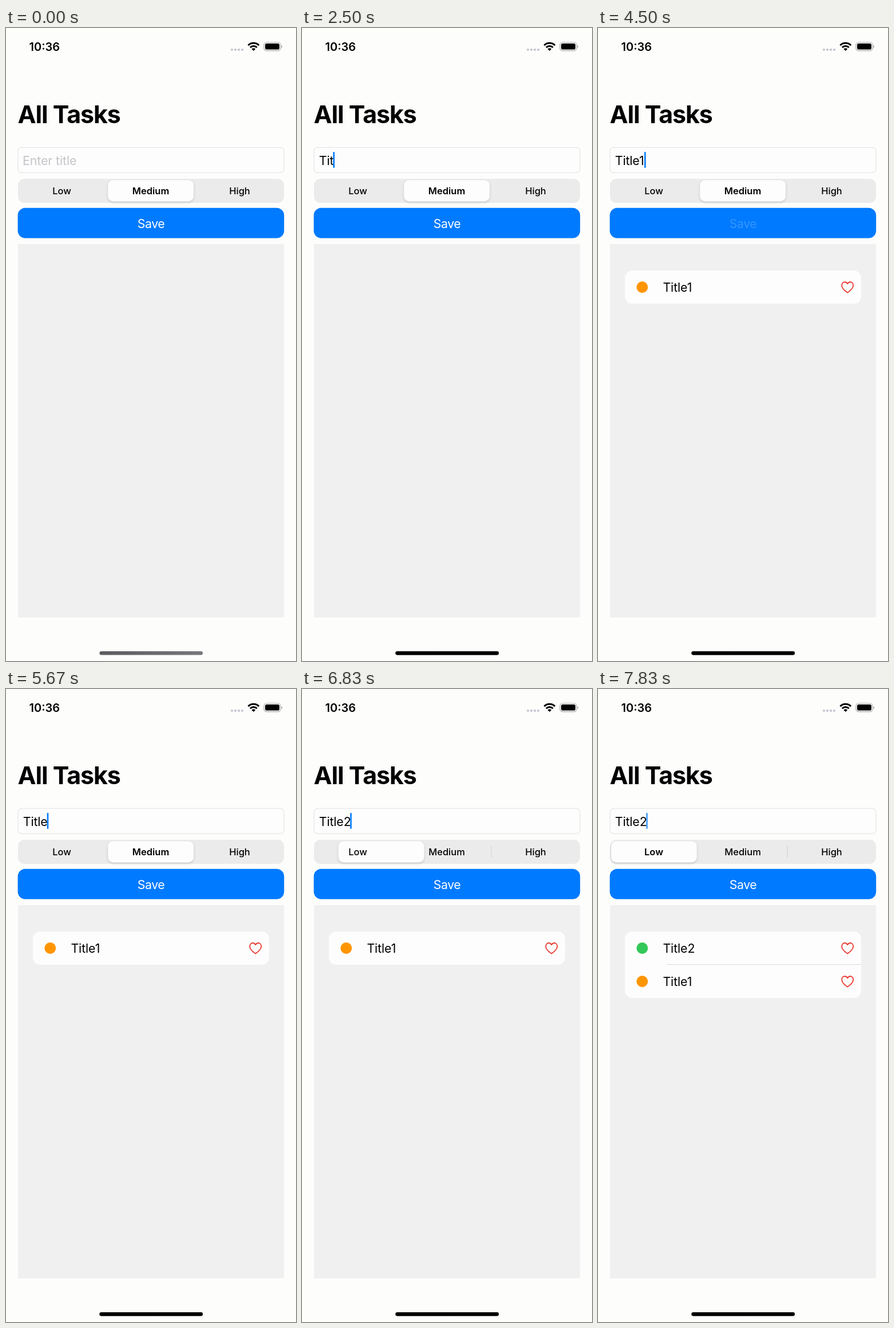
An HTML page for the animation above (8000 ms loop, 507 px wide and 1104 px high).

```html
<!DOCTYPE html>
<html lang="en">
<head>
<meta charset="utf-8">
<title>All Tasks</title>
<style>
  html, body { margin: 0; width: 100%; height: 100%; overflow: hidden; background: #fdfdfc; }
  svg { display: block; width: 507px; height: 1104px; }
  text { font-family: Inter, "Noto Sans", sans-serif; }
  .body { font-size: 21.4px; letter-spacing: -0.12px; }
  .seg { font-size: 16.5px; font-weight: 500; text-anchor: middle; }
  .heart { fill: none; stroke: #ec3a30; stroke-width: 1.8; stroke-linejoin: round; }
</style>
</head>
<body>
<svg viewBox="0 0 507 1104" xmlns="http://www.w3.org/2000/svg">
  <defs>
    <linearGradient id="barFill">
      <stop offset="0" stop-color="#5c5c60"/>
      <stop offset="1" stop-color="#77777c"/>
    </linearGradient>
    <filter id="soft" x="-10%" y="-30%" width="120%" height="170%">
      <feDropShadow dx="0" dy="2" stdDeviation="2.2" flood-color="#000" flood-opacity="0.17"/>
    </filter>
    <path id="heart" class="heart" d="M0 9.3C-4 6.7-10 2-10-3.4C-10-7-7.6-9.2-4.9-9.2C-2.6-9.2-1-8-0-6C1-8 2.6-9.2 4.9-9.2C7.6-9.2 10-7 10-3.4C10 2 4 6.7 0 9.3Z"/>
  </defs>
  <rect width="507" height="1104" fill="#fdfdfc"/>

  <!-- status bar -->
  <text x="40.5" y="40" font-size="20" font-weight="600">10:36</text>
  <g fill="#c5c5d2">
    <circle cx="395" cy="37.8" r="2.1"/><circle cx="401" cy="37.8" r="2.1"/>
    <circle cx="407" cy="37.8" r="2.1"/><circle cx="413" cy="37.8" r="2.1"/>
  </g>
  <g fill="none" stroke="#000" stroke-width="3">
    <path d="M423.4 30.2A13.3 13.3 0 0 1 442.2 30.2"/>
    <path d="M426.9 34A8.2 8.2 0 0 1 438.7 34"/>
  </g>
  <path d="M432.8 40L429.4 36.6A4.8 4.8 0 0 1 436.2 36.6Z"/>
  <rect x="451" y="25" width="29" height="14.6" rx="4.6" fill="none" stroke="#a6a6a8" stroke-width="1.2"/>
  <rect x="453" y="27" width="25" height="10.6" rx="2.8"/>
  <path d="M481.4 30V35Q483 34.3 483 32.5T481.4 30Z" fill="#a6a6a8"/>

  <text x="20.5" y="166.3" font-size="43" font-weight="700" letter-spacing="-1.1">All Tasks</text>

  <!-- title field -->
  <rect x="21" y="208.3" width="465" height="44" rx="6.5" fill="#fdfdfd" stroke="#e2e2e3" stroke-width="1.1"/>
  <text id="hint" class="body" x="29" y="238.6" fill="#c4c4ca">Enter title</text>
  <text id="typed" class="body" x="29.7" y="238.6"></text>
  <rect id="caret" y="216" width="2.6" height="28" rx="1.2" fill="#007aff"/>

  <!-- priority picker -->
  <rect x="21" y="263" width="465" height="42" rx="11" fill="#ebebec"/>
  <rect id="split" x="330.5" y="273" width="1.2" height="22" fill="#d4d4d5"/>
  <rect id="thumb" y="265.6" width="149.6" height="36.6" rx="9" fill="#fdfdfd" filter="url(#soft)"/>
  <text id="low" class="seg" x="97.5" y="290">Low</text>
  <text id="medium" class="seg" x="253" y="290">Medium</text>
  <text class="seg" x="408.5" y="290">High</text>

  <rect x="20.6" y="313.8" width="465.6" height="52.8" rx="13" fill="#007aff"/>
  <text id="save" x="253.5" y="348.6" font-size="21.4" letter-spacing="-0.5" fill="#fff" text-anchor="middle">Save</text>

  <!-- task list -->
  <rect x="21" y="377" width="465" height="651" fill="#f0f0f1"/>
  <rect id="card" x="47" y="423" width="413" rx="13" fill="#fdfdfd"/>
  <g id="first">
    <circle cx="77.3" cy="452" r="9.9" fill="#ff9500"/>
    <text class="body" x="113.4" y="459.8">Title1</text>
    <use href="#heart" x="436.2" y="452.2"/>
  </g>
  <g id="second">
    <circle cx="77.3" cy="452" r="9.9" fill="#34c759"/>
    <text class="body" x="113.4" y="459.8">Title2</text>
    <use href="#heart" x="436.2" y="452.2"/>
    <rect x="120" y="480" width="340" height="1.1" fill="#dcdcde"/>
  </g>

  <rect x="163.5" y="1087" width="180.5" height="6.6" rx="3.3" fill="url(#barFill)"/>
  <rect id="bar" x="163.5" y="1087" width="180.5" height="6.6" rx="3.3"/>
</svg>
<script>
const LOOP = 8000;
const FOCUS = 1330, ADD_1 = 4500, ADD_2 = 7420, SLIDE = 6660;
// time, field text, caret position
const typing = [
  [0, "", 30], [2250, "T", 42.5], [2420, "Ti", 47.5], [2500, "Tit", 54.4],
  [2750, "Titl", 59.8], [3000, "Title", 71.7], [3250, "Title1", 81],
  [5670, "Title", 71.7], [6330, "Title2", 84.2]
];
// caret fades: start time, target opacity
const blinks = [
  [FOCUS, 1], [2080, 0], [3750, 0], [4170, 1], [4670, 0], [5080, 1],
  [6830, 0], [7250, 1], [7750, 0]
];
const el = {};
document.querySelectorAll("svg [id]").forEach(n => el[n.id] = n);

const ramp = (t, start, len) => Math.min(1, Math.max(0, (t - start) / len));
const smooth = p => p * p * (3 - 2 * p);
const show = (node, on) => node.setAttribute("opacity", +on);

function caretAlpha(t, lastKey) {
  let a = lastKey > 0 ? 1 : 0;
  for (const [start, to] of blinks) {
    if (start < lastKey || t < start) continue;
    a += (to - a) * smooth(ramp(t, start, 250));
  }
  return a;
}

function saveAlpha(t, down, up) {
  const dim = 0.8 * smooth(ramp(t, down, 170));
  return 1 - dim * (1 - smooth(ramp(t, up, 420)));
}

function draw(t) {
  const [keyTime, text, caretX] = typing.filter(k => k[0] <= t).pop();
  el.typed.textContent = text;
  show(el.hint, !text);
  el.caret.setAttribute("x", caretX);
  show(el.caret, caretAlpha(t, keyTime));
  show(el.bar, ramp(t, FOCUS, 250));

  const slide = 1 - Math.pow(1 - ramp(t, SLIDE, 450), 2.8);
  el.thumb.setAttribute("x", 178.3 - 155.2 * slide);
  show(el.split, slide);
  el.low.style.fontWeight = slide > 0.9 ? 570 : 500;
  el.medium.style.fontWeight = slide > 0.1 ? 500 : 570;
  const touch = ramp(t, 6580, 80) * (1 - ramp(t, SLIDE, 120));
  show(el.low, 1 - 0.6 * touch);

  show(el.save, saveAlpha(t, 4170, ADD_1) * saveAlpha(t, 7170, ADD_2));

  const rows = (t >= ADD_1) + (t >= ADD_2);
  el.card.setAttribute("height", 58 * rows);
  show(el.first, rows > 0);
  show(el.second, rows > 1);
  el.first.setAttribute("transform", `translate(0 ${rows > 1 ? 58 : 0})`);
}

const began = performance.now();
function tick() {
  draw((performance.now() - began) % LOOP);
  requestAnimationFrame(tick);
}
tick();
</script>
</body>
</html>
```
